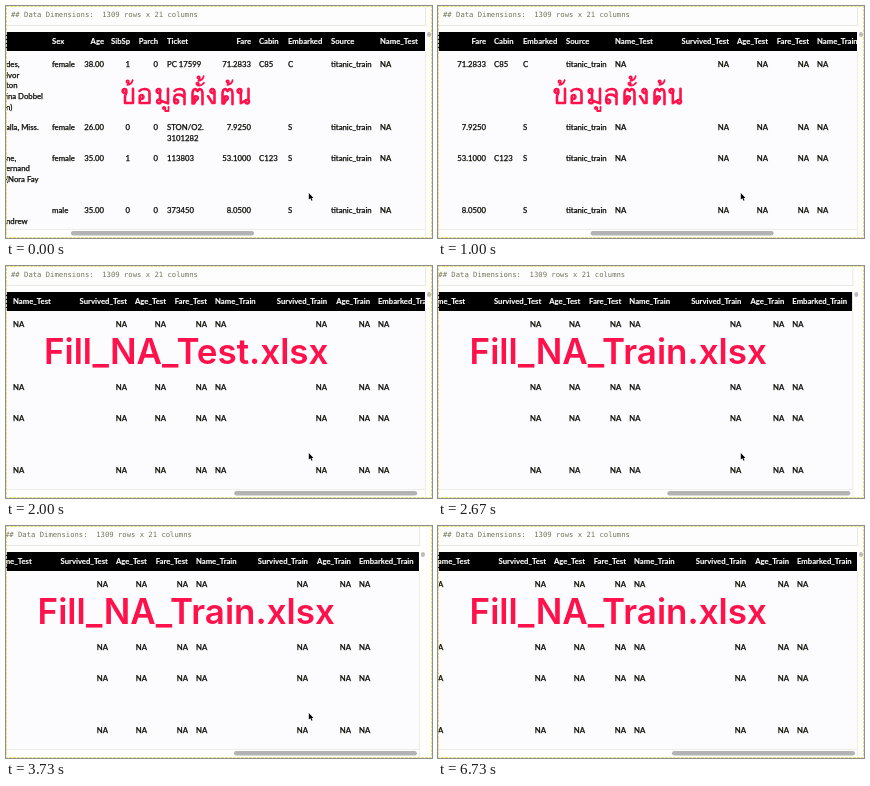
An HTML page with a canvas for the animation above (7.07 s loop, 426 px wide and 232 px high).

```html
<!DOCTYPE html>
<html lang="en">
<head>
<meta charset="utf-8">
<title>Scrolling data table</title>
<style>
html, body { margin: 0; width: 100%; height: 100%; overflow: hidden; background: #fff; }
canvas { display: block; }
</style>
</head>
<body>
<canvas id="stage" width="426" height="232" aria-label="ข้อมูลตั้งต้น, Fill_NA_Test.xlsx, Fill_NA_Train.xlsx"></canvas>
<script>
const ctx = document.getElementById('stage').getContext('2d');
const LOOP = 7070, STEP = 200 / 3;
const RED = '#ff114b';
const TABLE_FONT = 'Lato, sans-serif';
const BASELINES = [61, 124.3, 154.7, 207.2], LINE = 10.7;

// Time in ms, value
const SCROLL = [[0, 0], [130, 5], [270, 12], [530, 95], [800, 175], [930, 192], [1000, 197], [1200, 201],
  [1400, 206], [1670, 280], [1930, 362], [2000, 367], [2200, 369], [2400, 370], [2600, 380]];
const BOUNCE = [[2400, 0], [2800, 7], [3070, 7.5], [3270, 4], [3530, 0], [3630, 0], [3730, 6], [3870, 8],
  [4200, 0], [5200, 0], [5470, 8], [5870, 0]];

const na = Array(4).fill('NA');
const COLUMNS = [
  { x: 46, name: 'Sex', cells: ['female', 'female', 'female', 'male'] },
  { x: 98, right: true, name: 'Age', cells: ['38.00', '26.00', '35.00', '35.00'] },
  { x: 124, right: true, name: 'SibSp', cells: ['1', '0', '1', '0'] },
  { x: 152, right: true, name: 'Parch', cells: ['0', '0', '0', '0'] },
  { x: 161, name: 'Ticket', cells: ['PC 17599', 'STON/O2.\n3101282', '113803', '373450'] },
  { x: 245, right: true, name: 'Fare', cells: ['71.2833', '7.9250', '53.1000', '8.0500'] },
  { x: 253, name: 'Cabin', cells: ['C85', '', 'C123', ''] },
  { x: 282, name: 'Embarked', cells: ['C', 'S', 'S', 'S'] },
  { x: 325, name: 'Source', cells: Array(4).fill('titanic_train') },
  { x: 374, name: 'Name_Test', cells: na },
  { x: 488, right: true, name: 'Survived_Test', cells: na },
  { x: 527, right: true, name: 'Age_Test', cells: na },
  { x: 568, right: true, name: 'Fare_Test', cells: na },
  { x: 576, name: 'Name_Train', cells: na },
  { x: 688, right: true, name: 'Survived_Train', cells: na },
  { x: 731, right: true, name: 'Age_Train', cells: na },
  { x: 739, name: 'Embarked_Train', cells: na },
  { x: 0, name: '', cells: ['des,\nIvor\nton\nina Dobbel\nn)', 'alla, Miss.', 'ne,\nernand\n(Nora Fay', '\nndrew'] }
];

// Thai letters as pen strokes: [x, y, path]
const ring = (x, y, r) => `M${x - r} ${y}a${r} ${r} 0 1 1 ${2 * r} 0a${r} ${r} 0 1 1 ${-2 * r} 0`;
const MAI_THO = ring(1.6, 1.6, 1.2) + 'M2.8 1.6Q3 4 1.4 4.8Q5.5 4.6 6.6 .2';
const TO_TAO = ring(5, 10, 1.8) + 'M5 12L3 15.5H1.5V6Q1.5 1 4.5 1L6.5 3L8.5 1Q11.5 1 11.5 6V16.3';
const THAI = [
  [116, 82, ring(2.5, 3, 1.9) + 'M4.4 3C5 6 3 6 3 9V15H11V.7'],
  [120, 74, MAI_THO],
  [132, 82, ring(3.6, 9, 1.9) + 'M1.7 9V15H11.5V5Q11.5 1 6.5 1Q3 1 1.5 3'],
  [150, 82, ring(2.5, 3, 1.9) + 'M4 4V11.8' + ring(3, 13.4, 1.9) + 'M4.8 12.8L12 15.4V.7'],
  [156, 100, ring(2, 2, 1.2) + 'M3.2 2V5H6.5V.8'],
  [167, 82, ring(3.2, 13.4, 1.9) + 'M1.3 13.4V10Q1.5 6.5 5.5 6.5Q9 6.5 11.5 9.5M11.5 16.3V5Q11.5 1 6.5 1Q3 1 1.5 3'],
  [185, 82, TO_TAO],
  [190, 76, ring(1.6, 1.8, 1.2) + 'M1 3Q4 5 8 .8'],
  [191, 70, MAI_THO],
  [201, 82, ring(5.3, 3, 1.9) + 'M7.5 3V15H5.4L1 8'],
  [215, 82, TO_TAO],
  [220, 74, MAI_THO],
  [231, 82, ring(2.5, 3, 1.9) + 'M3.8 4.5V15.2L9 12.4' + ring(10.2, 13.6, 1.8) + 'M11.5 12.4V.7']
].map(([x, y, d]) => [x, y, new Path2D(d)]);

const ARROW = new Path2D('M0 0V6.6L1.5 5.3L2.7 7.8L3.8 7.3L2.7 4.9H4.7Z');

function at(keys, t) {
  if (t <= keys[0][0]) return keys[0][1];
  for (let i = 1; i < keys.length; i++) {
    const [t0, a] = keys[i - 1], [t1, b] = keys[i];
    if (t <= t1) return a + (b - a) * (t - t0) / (t1 - t0);
  }
  return keys[keys.length - 1][1];
}

// A thin outline in the fill colour makes small text heavier
function text(str, x, y, font, color, align = 'left', outline = 0) {
  ctx.font = font;
  ctx.fillStyle = ctx.strokeStyle = color;
  ctx.textAlign = align;
  ctx.fillText(str, x, y);
  if (!outline) return;
  ctx.lineWidth = outline;
  ctx.strokeText(str, x, y);
}

function box(x, y, w, h, color) {
  ctx.fillStyle = color;
  ctx.fillRect(x, y, w, h);
}

function pill(x, y, w, h, color) {
  ctx.fillStyle = color;
  ctx.beginPath();
  ctx.roundRect(x, y, w, h, Math.min(w, h) / 2);
  ctx.fill();
}

function drawTable(scroll) {
  ctx.save();
  ctx.beginPath();
  ctx.rect(0, 26, 419, 197);
  ctx.clip();
  box(0, 45, 419, 178, '#fcfcfe');
  box(0, 26, 419, 19, '#000');
  for (const { x, right, name, cells } of COLUMNS) {
    const left = x - scroll, align = right ? 'right' : 'left';
    text(name, left, 38.3, `bold 7.7px ${TABLE_FONT}`, '#fff', align, 0.15);
    cells.forEach((cell, row) => cell.split('\n').forEach((line, i) =>
      text(line, left, BASELINES[row] + i * LINE, `500 7.75px ${TABLE_FONT}`, '#10100a', align, 0.25)));
  }
  ctx.restore();
}

function drawPage(scroll, shift) {
  ctx.save();
  ctx.translate(-shift, 0);
  box(0, 1, 419, 18, '#fdfdfd');
  box(0, 19, 420, 1, '#e8e8e0');
  box(419, 1, 1, 19, '#e8e8e0');
  text('## Data Dimensions:  1309 rows x 21 columns', 5, 11.4,
    '7.22px "DejaVu Sans Mono", monospace', '#74745c');
  drawTable(scroll);
  box(0, 223, 420, 1, '#eeeee6');
  box(419, 45, 1, 187, '#eeeee6');
  pill(65 + scroll * 169 / 380, 225, 183, 4.5, '#b3b3b3');
  pill(421, 26, 4, 5, '#bdbdbd');
  ctx.restore();
}

function drawCaption(t) {
  if (t >= 1400) {
    const part = t < 2400 ? 'Test' : 'Train';
    text(`Fill_NA_${part}.xlsx`, 180.2, 97.5, '600 35px Inter, sans-serif', RED, 'center');
    return;
  }
  ctx.strokeStyle = RED;
  ctx.lineJoin = ctx.lineCap = 'round';
  for (const [x, y, path] of THAI) {
    ctx.save();
    ctx.translate(x, y);
    ctx.lineWidth = y === 82 ? 2.6 : 1.8;
    ctx.stroke(path);
    ctx.restore();
  }
}

function drawCursor(t) {
  if (t >= 6400) return;
  const k = Math.max(0, (t - 5950) / 450);
  ctx.save();
  ctx.translate(302.8 - 70 * k, 187 + 48 * k * k);
  ctx.strokeStyle = '#fff';
  ctx.lineWidth = 1.2;
  ctx.stroke(ARROW);
  ctx.fillStyle = '#000';
  ctx.fill(ARROW);
  ctx.restore();
}

function drawFrame() {
  ctx.save();
  ctx.strokeStyle = '#e6df78';
  ctx.lineWidth = 1;
  ctx.setLineDash([2, 2]);
  ctx.strokeRect(0.5, 0.5, 425, 231);
  ctx.restore();
}

function draw(now) {
  const t = Math.floor((now % LOOP) / STEP + 0.1) * STEP;
  box(0, 0, 426, 232, '#fff');
  drawPage(at(SCROLL, t), at(BOUNCE, t));
  drawCaption(t);
  drawCursor(t);
  drawFrame();
}

const start = performance.now();
function tick() {
  draw(performance.now() - start);
  requestAnimationFrame(tick);
}
tick();
</script>
</body>
</html>
```
